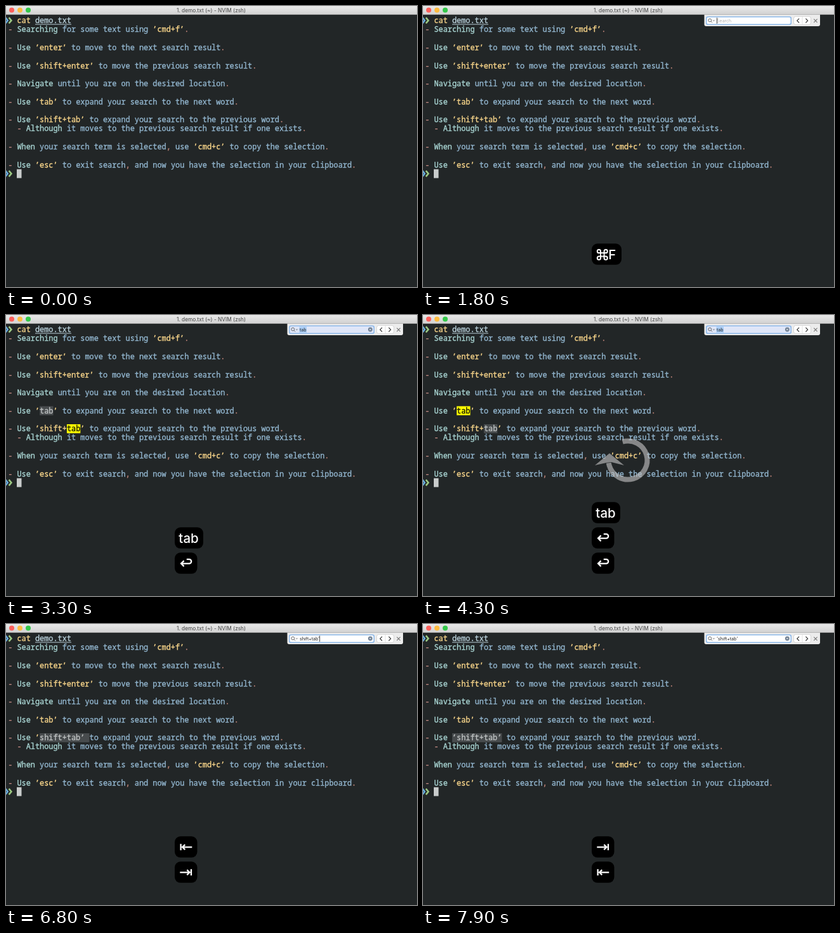
An HTML page with a canvas that plays this animation: 648x445 px, repeating every 8000 ms.

```html
<!DOCTYPE html>
<html>
<head>
<meta charset="utf-8">
<style>
html, body { margin: 0; width: 100%; height: 100%; overflow: hidden; background: #222627; }
canvas { display: block; }
</style>
</head>
<body>
<canvas width="648" height="445"></canvas>
<script>
const g = document.querySelector('canvas').getContext('2d');
const LOOP = 8000, CELL = 7.13, ROW = 14.27, LEFT = 3.2;
const MONO = '500 11.88px "Noto Sans Mono", "DejaVu Sans Mono", monospace';
const UI = 'Inter, "Liberation Sans", sans-serif';
const LINES = [
  '  cat demo.txt',
  '- Searching for some text using ’cmd+f’.', '',
  '- Use ’enter’ to move to the next search result.', '',
  '- Use ’shift+enter’ to move the previous search result.', '',
  '- Navigate until you are on the desired location.', '',
  '- Use ’tab’ to expand your search to the next word.', '',
  '- Use ’shift+tab’ to expand your search to the previous word.',
  '  - Although it moves to the previous search result if one exists.', '',
  '- When your search term is selected, use ’cmd+c’ to copy the selection.', '',
  '- Use ’esc’ to exit search, and now you have the selection in your clipboard.'
];

// Key badges: [time pressed, kind]
const KEYS = [[750, 'cmd'], [3130, 'tab'], [3230, 'enter'], [4150, 'enter'],
  [5500, 'enter'], [6100, 'back'], [6750, 'fwd'], [7400, 'back']];
const TYPED = [2880, 3000, 3130];
const KEY_LIFE = 1300, KEY_FADE = 120;

// Highlights: [start, ...[row, column, length, is current]]
const MARKS = [
  [0],
  [3130, [9, 7, 3, 1], [11, 13, 3, 0]],
  [3230, [9, 7, 3, 0], [11, 13, 3, 1]],
  [4150, [9, 7, 3, 1], [11, 13, 3, 0]],
  [5620, [9, 7, 3, 0], [11, 13, 3, 1]],
  [6100, [11, 7, 9, 0]],
  [6750, [11, 7, 11, 0]],
  [7400, [11, 6, 11, 0]]
];

const clamp = v => Math.max(0, Math.min(1, v));
const colX = c => LEFT + c * CELL;
const baseY = r => 27.2 + r * ROW;

function rect(x, y, w, h, fill, r = 0) {
  g.fillStyle = fill;
  g.beginPath();
  g.roundRect(x, y, w, h, r);
  g.fill();
}
function disc(x, y, r, fill) {
  g.fillStyle = fill;
  g.beginPath();
  g.arc(x, y, r, 0, 7);
  g.fill();
}
function stroke(d, color, width) {
  g.strokeStyle = color;
  g.lineWidth = width;
  g.stroke(new Path2D(d));
}
function text(s, x, y, fill, font) {
  g.font = font;
  g.fillStyle = fill;
  g.fillText(s, x, y);
}
// Terminal glyphs get a hairline outline for their sturdier weight.
function mono(s, col, row, color) {
  text(s, colX(col), baseY(row), color, MONO);
  g.strokeStyle = color;
  g.lineWidth = 0.35;
  g.strokeText(s, colX(col), baseY(row));
}

function tokenColor(s, row) {
  if (!row) return s == 'cat' ? '#f8d58a' : '#b9d0da';
  if (s[0] == '’') return '#f8d58a';
  if (/^[A-Z]/.test(s)) return '#a9d5d3';
  if (s == '-') return '#c98f87';
  return /^[.,]/.test(s) ? '#c08578' : '#93b7d0';
}
function prompt(row) {
  const y = baseY(row) - 4.3;
  stroke(`M-0.8 ${y - 4.6}l3.4 4.6-3.4 4.6`, '#6aaede', 2.6);
  stroke(`M4.6 ${y - 4.6}l3.8 4.6-3.8 4.6`, '#9cc982', 2.6);
}
function terminal(t) {
  rect(0, 0, 648, 445, '#222627');
  LINES.forEach((line, row) => {
    const words = row ? /’[^’]*’|[.,]|[^\s.,’]+/g : /\S+/g;
    for (const m of line.matchAll(words))
      mono(m[0], m.index, row, tokenColor(m[0], row));
  });
  rect(colX(6), 28.6, 8 * CELL, 1, '#b9d0da');
  prompt(0);
  prompt(17);
  rect(17, 258.5, 7.5, 14, '#c9cccc');
  const marks = MARKS.filter(m => m[0] <= t).pop().slice(1);
  for (const [row, col, len, current] of marks) {
    rect(colX(col), baseY(row) - 11.2, len * CELL, ROW, current ? '#ffff00' : '#474b4d');
    mono(LINES[row].substr(col, len), col, row, current ? '#1a1a00' : '#c0c4c4');
  }
}

function fieldText(t) {
  if (t >= 7400) return "'shift+tab'";
  if (t >= 6750) return "shift+tab'";
  if (t >= 6100) return 'shift+tab';
  return 'tab'.slice(0, TYPED.filter(k => k <= t).length);
}
function findBar(t) {
  if (t < 750) return;
  const p = clamp((t - 750) / 150), font = '7px ' + UI;
  const selected = t >= 3230 && t < 6100;
  g.save();
  g.translate(0, -19 * (1 - p) ** 2);
  rect(443.5, 10, 182.5, 22, '#ececec', 3);
  rect(446, 16.5, 135, 13.5, '#8db9ea', 3);
  rect(447.5, 18, 132, 10.5, selected && t < 5500 ? '#dfe6f8' : '#fff', 2);
  g.strokeStyle = '#555';
  g.lineWidth = 0.9;
  g.beginPath();
  g.arc(452.3, 22.6, 2.4, 0, 7);
  g.stroke();
  stroke('M454 24.4l2 2M457.2 22.4l1.3 1.3 1.3-1.3', '#555', 0.9);
  const value = fieldText(t);
  g.font = font;
  const end = 463 + g.measureText(value).width;
  if (selected) rect(462.5, 18.5, end - 462, 9.5, '#a9cdf6');
  text(value || 'Search', 463, 25.7, value ? '#222' : '#b5b5b5', font);
  if (!selected && (t + 100) % 1000 > 500) rect(end, 18.5, 0.9, 9.5, '#333');
  if (value) {
    disc(574.3, 23, 3.4, '#6f7f92');
    stroke('M573 21.7l2.6 2.6m0-2.6l-2.6 2.6', '#fff', 0.8);
  }
  rect(584.5, 16.5, 27, 13, '#c4c4c4', 3);
  rect(585, 17, 26, 12, '#fff', 2.5);
  rect(597.7, 17, 0.6, 12, '#ccc');
  stroke('M593 19.8l-3.2 3.4 3.2 3.4M603.4 19.8l3.2 3.4-3.2 3.4', '#333', 1.2);
  stroke('M616.2 20.7l5.4 5.4m0-5.4l-5.4 5.4', '#777', 1.1);
  g.restore();
}

function titleBar() {
  const shade = g.createLinearGradient(0, 0, 0, 13);
  shade.addColorStop(0, '#e9e9e9');
  shade.addColorStop(1, '#d2d2d2');
  rect(0, 0, 648, 13.5, shade);
  rect(0, 13, 648, 0.7, '#a9a9a9');
  ['#fc605b', '#fdbc40', '#34c84a'].forEach((c, i) => disc(9 + 13 * i, 6.5, 4, c));
  g.textAlign = 'center';
  text('1. demo.txt (~) - NVIM (zsh)', 323.5, 9.8, '#444', '8.3px ' + UI);
  g.textAlign = 'left';
}

// Clockwise ring, open at the upper left, ending in an upward arrowhead.
function wrapIcon(t) {
  if (t < 4150 || t > 4900) return;
  g.save();
  g.globalAlpha = 0.62 * clamp((4900 - t) / 450);
  g.beginPath();
  g.arc(323, 230, 30.5, -1.85, Math.PI - 0.14);
  g.strokeStyle = '#c4c4c4';
  g.lineWidth = 8;
  g.stroke();
  g.fillStyle = '#c4c4c4';
  g.fill(new Path2D('M271 238L294 219L317 238L297 233L289 234Z'));
  g.restore();
}

function commandGlyph(x, y) {
  const s = 2.8, r = 2.6, c = s + r;
  g.strokeStyle = '#fff';
  g.lineWidth = 2;
  for (let i = 0; i < 4; i++) {
    g.save();
    g.translate(x, y);
    g.rotate(i * Math.PI / 2);
    g.beginPath();
    g.moveTo(s, 0);
    g.arc(c, -c, r, Math.PI, Math.PI / 2);
    g.lineTo(0, -s);
    g.stroke();
    g.restore();
  }
}
const ICONS = {
  enter: 'M1 -6.5h4a3.4 3.4 0 0 1 3.4 3.4a3.4 3.4 0 0 1 -3.4 3.4h-12M-3.2 -4.2l-4.5 4.5 4.5 4.5',
  back: 'M-8.2 -5v10M9.5 0h-15M-1.5 -4l-4.2 4 4.2 4',
  fwd: 'M8.2 -5v10M-9.5 0h15M1.5 -4l4.2 4-4.2 4'
};
function badge(kind, label, y) {
  const font = '500 20.5px ' + UI;
  rect(266, y, { cmd: 47, tab: 45 }[kind] || 35.5, 33.5, '#000', 9);
  if (kind == 'cmd') {
    commandGlyph(282.8, y + 17.5);
    text('F', 292.3, y + 25, '#fff', font);
  } else if (kind == 'tab') {
    text(label, 272.3, y + 25, '#fff', font);
  } else {
    g.save();
    g.translate(283.8, y + 17);
    stroke(ICONS[kind], '#fff', 2.3);
    g.restore();
  }
}
function badges(t) {
  let slot = 0;
  for (const [pressed, kind] of [...KEYS].reverse()) {
    const start = kind == 'tab' ? TYPED[0] : pressed;
    const left = pressed + KEY_LIFE - t;
    if (t < start || left <= 0) continue;
    g.globalAlpha = clamp(left / KEY_FADE);
    badge(kind, fieldText(t), 376.3 - 40 * slot++);
  }
  g.globalAlpha = 1;
}

function draw(now) {
  const t = now % LOOP;
  terminal(t);
  findBar(t);
  titleBar();
  wrapIcon(t);
  badges(t);
}
const origin = performance.now();
function frame() {
  draw(performance.now() - origin);
  requestAnimationFrame(frame);
}
frame();
</script>
</body>
</html>
```
